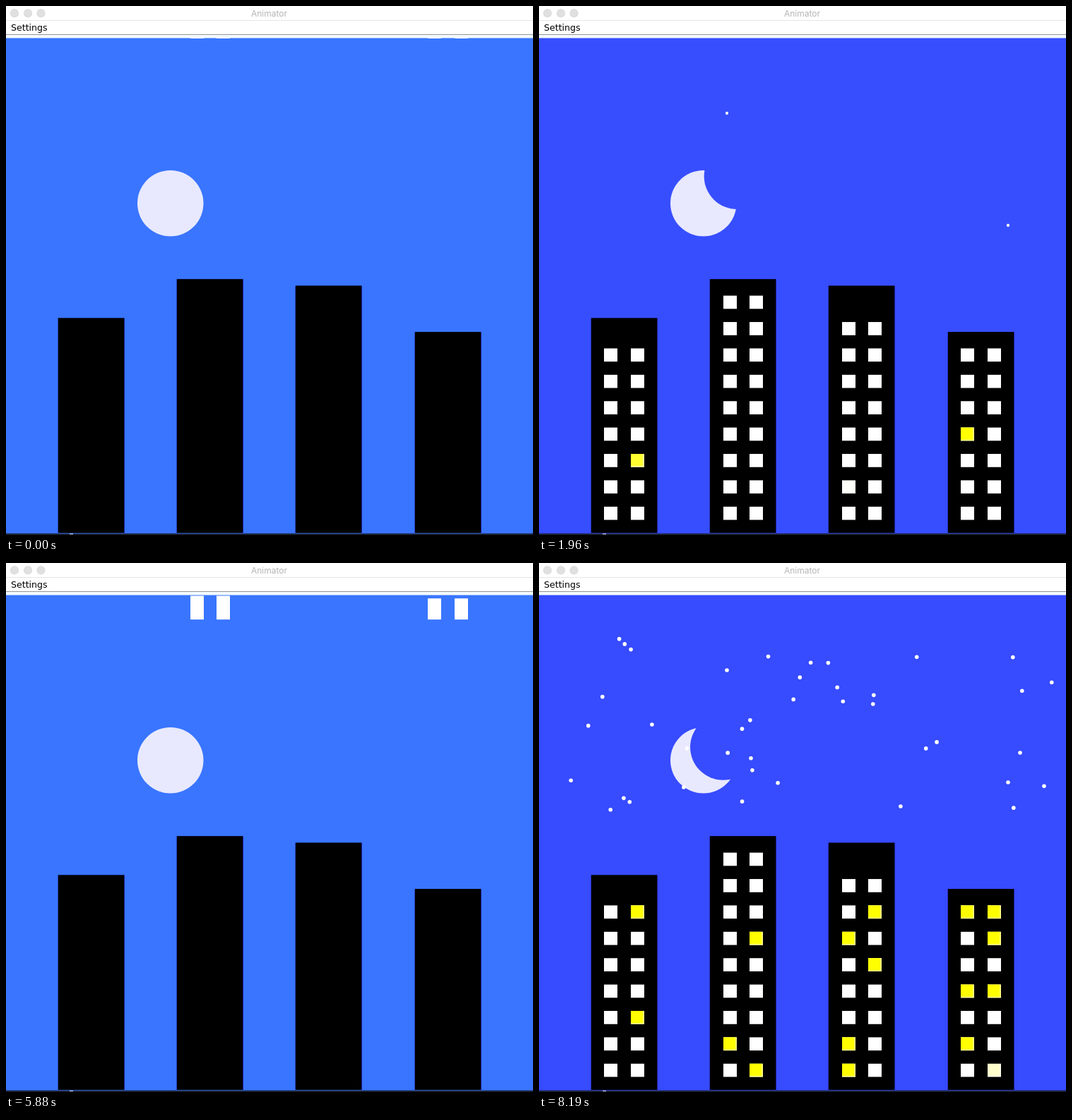
An HTML page with a canvas for the animation above (8260 ms loop, 746x750 px).

```html
<!DOCTYPE html>
<html lang="en">
<head>
<meta charset="utf-8">
<title>Animator</title>
<style>
  html, body { margin: 0; width: 100%; height: 100%; overflow: hidden; background: #fff; }
  canvas { display: block; width: 746px; height: 750px; }
</style>
</head>
<body>
<canvas id="stage" width="746" height="750"></canvas>
<script>
const ctx = document.getElementById('stage').getContext('2d');
const LOOP = 8260, FRAME = 70, UNIT = 0.935;
const X = u => -1 + u * UNIT;
const Y = u => 46 + u * UNIT;
const clamp = v => Math.max(0, Math.min(1, v));

// Heights in scene units; window columns enter alternately from below and above
const towers = [
  { roof: 424, rows: 7 }, { roof: 365, rows: 9 },
  { roof: 375, rows: 8 }, { roof: 445, rows: 7 }
].map((t, i) => ({ ...t, x: 80 + 180 * i, top: 750 - 40 * t.rows, from: i % 2 ? -20 : 780 }));

// Windows that light up, in order, counted row by row through all towers
const lit = [54, 9, 44, 48, 28, 35, 58, 21, 36, 1, 55, 39, 49, 31, 46, 51, 61];
const litAt = i => 43 + 1.2 * i + 2.55 * Math.max(0, i - 1.4);

let seed = 29;
function random() {
  seed = (seed * 16807) % 2147483647;
  return seed / 2147483647;
}

const stars = [{ x: 266, y: 152, at: 44.7 }, { x: 664, y: 311, at: 44.7 }];
for (let i = 0; i < 38; i++) {
  stars.push({ x: 45 + 700 * random(), y: 107 + 247 * random(), at: 47 + i * 1.35 });
}

function skyColor(tick) {
  const k = clamp(tick / 50);
  return `rgb(${Math.round(57 - 2 * k)},${Math.round(117 - 42 * k ** 1.4)},255)`;
}

// A slow start, a faster rest, then a fast replay
function tickAt(ms) {
  const n = Math.floor(ms / FRAME);
  if (n < 8) return 0;
  if (n <= 16) return n - 5;
  if (n < 68) return Math.min(107, 11 + (n - 16) * 3);
  return n < 84 ? 0 : 1 + (n - 84) * 3;
}

function rect(color, x, y, w, h) {
  ctx.fillStyle = color;
  ctx.fillRect(x, y, w, h);
}

function circle(x, y, r) {
  ctx.beginPath();
  ctx.arc(x, y, r, 0, Math.PI * 2);
}

function disc(color, x, y, r) {
  circle(x, y, r);
  ctx.fillStyle = color;
  ctx.fill();
}

function label(text, x, y, font, color, align) {
  ctx.font = font;
  ctx.fillStyle = color;
  ctx.textAlign = align;
  ctx.fillText(text, x, y);
}

function drawChrome() {
  rect('#fff', 0, 0, 746, 46);
  rect('#e6e6e6', 0, 20, 746, 1);
  rect('#959595', 0, 40, 746, 1);
  rect('#f4fbff', 0, 41, 746, 5);
  for (const x of [12, 31, 49.5]) {
    disc('#d6d6d6', x, 10.3, 6);
    disc('#e0e0e0', x, 10.3, 5.3);
  }
  label('Animator', 372.5, 15, '12px Inter, sans-serif', '#b4b4b4', 'center');
  label('Settings', 7, 35, '12.6px "DejaVu Sans", sans-serif', '#000', 'left');
  rect('#1b2238', 0, 747, 746, 3);
  rect('#c9ccd6', 90, 748, 5, 1);
}

function drawTower(t) {
  const x = Math.round(X(t.x)), y = Y(t.roof), w = 93;
  rect('#1c1c8c', x - 0.5, y, w + 1.5, 747 - y);
  rect('#000', x, y, w, 747 - y);
}

function drawWindows(tick) {
  const f = clamp(tick / 20), size = 20 * UNIT;
  let id = 0;
  for (const t of towers) {
    for (let row = 0; row < t.rows; row++) {
      const y = Y(t.from + (t.top + row * 40 - t.from) * f);
      for (let col = 0; col < 2; col++) {
        const x = Math.round(X(t.x + 20 + col * 40) - 0.1);
        rect('#fff', x, y, 19, size);
        const order = lit.indexOf(id++);
        const k = order < 0 ? 0 : clamp((tick - litAt(order)) / 4);
        rect(`rgba(255,255,120,${k})`, x, y, 19, size);
        rect(`rgba(255,255,0,${k})`, x, y, 17, size - 1.7);
      }
    }
  }
}

// A sky-coloured disc slides over the moon
function drawMoon(tick, color) {
  const x = X(250), y = Y(250), r = 50 * UNIT;
  const away = 7 * Math.max(0, Math.min(30, 50 - tick));
  disc('#e8e9fe', x, y, r);
  ctx.save();
  circle(x, y, r + 1);
  ctx.clip();
  disc(color, x + (30 + away) * UNIT, y - (20 + away) * UNIT, r);
  ctx.restore();
}

function drawStars(tick) {
  for (const s of stars) disc('#fff', s.x, s.y, 2.8 * clamp((tick - s.at) / 3));
}

function draw(now) {
  const tick = tickAt(now % LOOP), color = skyColor(tick);
  drawChrome();
  ctx.save();
  ctx.beginPath();
  ctx.rect(0, 45.5, 746, 702.3);
  ctx.clip();
  rect(color, 0, 45, 746, 703);
  towers.forEach(drawTower);
  drawWindows(tick);
  drawMoon(tick, color);
  drawStars(tick);
  ctx.restore();
}

const begin = performance.now();
function loop() {
  draw(performance.now() - begin);
  requestAnimationFrame(loop);
}
loop();
</script>
</body>
</html>
```
